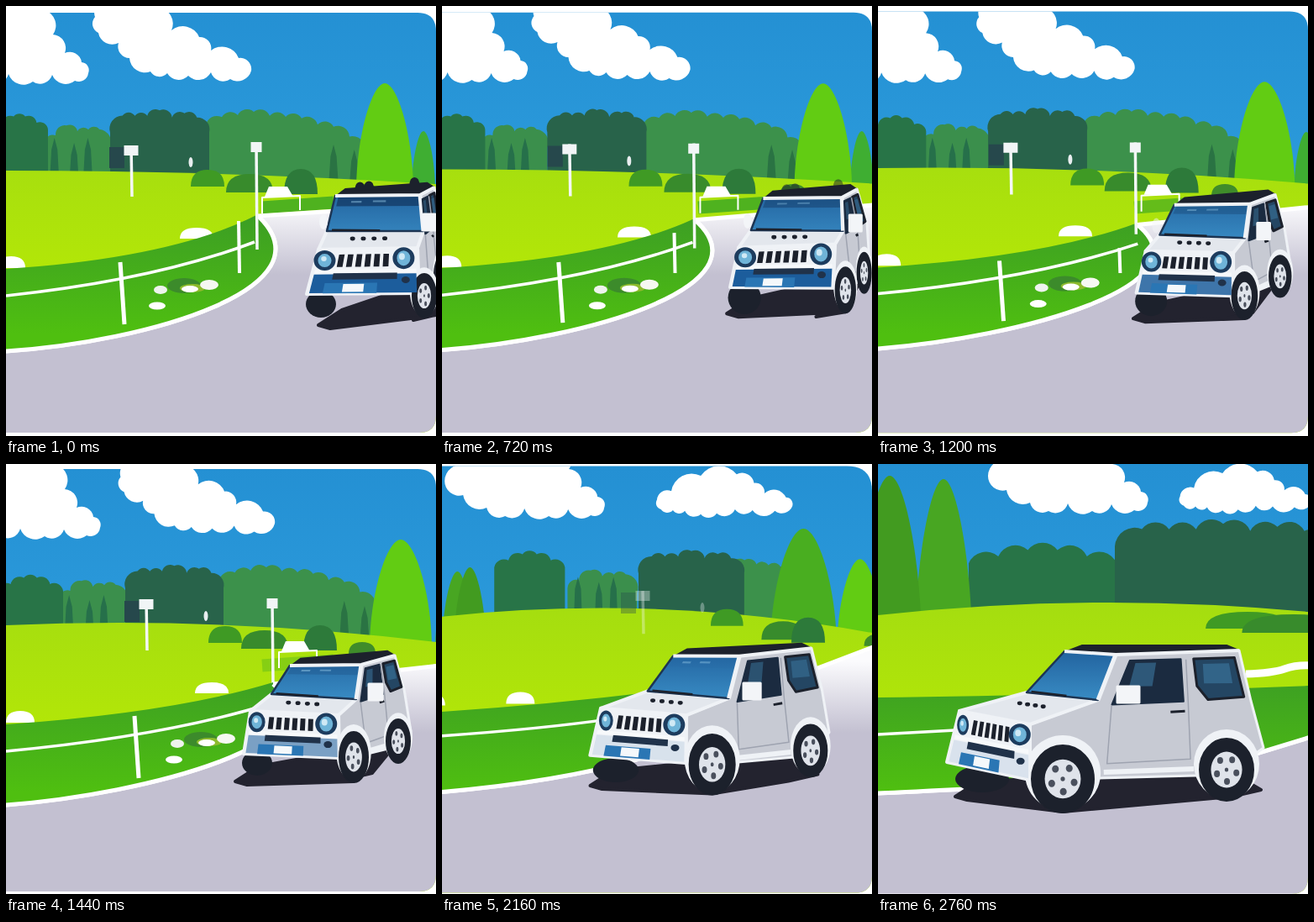
An HTML page for the animation above (2.88 s loop, 512x512 px).

```html
<!DOCTYPE html>
<html lang="en">
<head>
<meta charset="utf-8">
<title>Country road drive</title>
<style>
  html, body { margin: 0; width: 100%; height: 100%; overflow: hidden; background: #fff; }
  svg { display: block; width: 100vw; height: 100vh; }
</style>
</head>
<body>
<svg id="stage" viewBox="0 0 512 512">
  <defs>
    <clipPath id="card"><path id="cardPath"/></clipPath>
    <linearGradient id="sky" x1="0" y1="0" x2="0" y2="200" gradientUnits="userSpaceOnUse">
      <stop offset="0" stop-color="#2490d3"/><stop offset="1" stop-color="#2b9adb"/>
    </linearGradient>
    <linearGradient id="field" x1="0" y1="160" x2="0" y2="310" gradientUnits="userSpaceOnUse">
      <stop offset="0" stop-color="#a4dd10"/><stop offset="1" stop-color="#b2e608"/>
    </linearGradient>
    <linearGradient id="verge" x1="0" y1="250" x2="0" y2="390" gradientUnits="userSpaceOnUse">
      <stop offset="0" stop-color="#3c9e24"/><stop offset="1" stop-color="#4fbf10"/>
    </linearGradient>
    <linearGradient id="road" x1="0" y1="235" x2="0" y2="320" gradientUnits="userSpaceOnUse">
      <stop offset="0" stop-color="#fbfbfd"/><stop offset="1" stop-color="#c3c0d1"/>
    </linearGradient>
    <linearGradient id="glass" x1="0" y1="222" x2="0" y2="285" gradientUnits="userSpaceOnUse">
      <stop offset="0" stop-color="#22639f"/><stop offset="1" stop-color="#3a8ec6"/>
    </linearGradient>
  </defs>
  <g id="scene" clip-path="url(#card)"></g>
</svg>
<script>
const STEP = 120, LOOP = 2880;
const KEYS = [0, 480, 960, 1440, 1800, 2400, 2760];
const scene = document.getElementById('scene');
const cardPath = document.getElementById('cardPath');
const parts = [];
let now = 0;

// Monotone cubic curve through one value per key time.
function track(...v) {
  const s = v.slice(1).map((y, i) => (y - v[i]) / (KEYS[i + 1] - KEYS[i]));
  const m = v.map((_, i) => {
    const a = s[i - 1] ?? s[i], b = s[i] ?? s[i - 1];
    return a * b > 0 ? 2 * a * b / (a + b) : 0;
  });
  return () => {
    let i = KEYS.findIndex(k => k > now) - 1;
    if (i < 0) return v[v.length - 1];
    const h = KEYS[i + 1] - KEYS[i], u = (now - KEYS[i]) / h, w = 1 - u;
    return v[i] * w * w * (1 + 2 * u) + v[i + 1] * u * u * (3 - 2 * u)
      + h * u * w * (m[i] * w - m[i + 1] * u);
  };
}
function point(xs, ys) {
  const x = track(...xs), y = track(...ys);
  return () => [x(), y()];
}
const mix = (p, q, u) => [p[0] + (q[0] - p[0]) * u, p[1] + (q[1] - p[1]) * u];
const move = (p, dx, dy) => [p[0] + dx, p[1] + dy];
const pos = p => p[0].toFixed(2) + ' ' + p[1].toFixed(2);
const poly = (...ps) => 'M' + ps.map(pos).join('L') + 'Z';
const line = (...ps) => 'M' + ps.map(pos).join('L');
const box = (x, y, w, h) => `M${x} ${y}h${w}v${h}h${-w}z`;
const oval = (c, rx, ry) => `M${c[0] - rx} ${c[1]}a${rx} ${ry} 0 1 1 ${2 * rx} 0a${rx} ${ry} 0 1 1 ${-2 * rx} 0z`;
const dome = (x, y, w, h) => `M${x - w} ${y}Q${x - w} ${y - h} ${x} ${y - h}T${x + w} ${y}z`;
// Position inside a four-cornered panel: top left, top right, bottom right, bottom left.
const inside = (q, u, v) => mix(mix(q[0], q[1], u), mix(q[3], q[2], u), v);
const patch = (q, u0, v0, u1, v1) =>
  poly(inside(q, u0, v0), inside(q, u1, v0), inside(q, u1, v1), inside(q, u0, v1));

function part(fill, draw, { alpha, stroke, width = 2 } = {}) {
  const node = document.createElementNS('http://www.w3.org/2000/svg', 'path');
  node.setAttribute('fill', fill);
  if (stroke) {
    node.setAttribute('stroke', stroke);
    node.setAttribute('stroke-width', width);
    node.setAttribute('stroke-linejoin', 'round');
  }
  scene.append(node);
  parts.push({ node, draw, alpha });
}
const ink = (color, width, draw, alpha) => part('none', draw, { stroke: color, width, alpha });

// Outline whose edges bulge outwards.
function puff(ps) {
  return 'M' + pos(ps[0]) + ps.map((p, i) => {
    const q = ps[(i + 1) % ps.length];
    const r = Math.hypot(q[0] - p[0], q[1] - p[1]) * .62;
    return `A${r} ${r} 0 0 1 ${pos(q)}`;
  }).join('') + 'Z';
}
const pairs = list => list.split(' ').map(p => p.split(',').map(Number));

/* ---------- sky and clouds ---------- */
const cardTop = track(8, 8, 7, 6, 5, 1, 0);
const cardEnd = track(508, 508, 508, 509, 510, 511, 512);
const cardRound = track(22, 22, 22, 22, 22, 34, 0);

part('url(#sky)', () => box(0, 0, 512, 260));

const cloudA = pairs('0,0 -16,9 -43,2 -66,10 -95,1 -118,10 -140,0 -168,-15 -190,-32 -165,-50 -130,-75 -52,-75 -42,-46 -28,-24 -8,-13');
const tipA = point([98, 110, 93, 112, 147, 232, 321], [80, 77, 79, 76, 62, 48, 46]);
part('#fff', () => puff(cloudA.map(p => move(tipA(), ...p))));

const cloudB1 = pairs('0,0 -25,10 -48,2 -75,6 -100,3 -120,1 -145,-15 -158,-33 -182,-45 -186,-64 -172,-85 -110,-75 -95,-48 -62,-40 -48,-24 -15,-15');
const cloudB2 = pairs('0,0 -22,6 -50,5 -72,4 -95,9 -115,10 -135,6 -150,5 -165,4 -170,-8 -152,-19 -115,-38 -70,-40 -48,-29 -35,-16 -8,-11');
const tipB = point([292, 294, 298, 320, 379, 445, 516], [77, 75, 77, 71, 62, 46, 46]);
const shapeB = track(0, 0, 0, .15, 1, 1, 1);
const sizeB = track(1, 1, 1, 1, 1, .92, .92);
part('#fff', () => puff(cloudB1.map((p, i) => {
  const [x, y] = mix(p, cloudB2[i], shapeB()), k = sizeB();
  return move(tipB(), x * k, y * k);
})));

/* ---------- woods ---------- */
function woods(color, xs0, xs1, tops, n, rough, slope = 0) {
  const a = track(...xs0), b = track(...xs1), top = track(...tops);
  part(color, () => {
    const ps = [[a(), 220]];
    for (let i = 0; i <= n; i++) {
      const u = i / n, edge = Math.abs(2 * u - 1) ** 4 * 18;
      const bump = rough * (.5 + .5 * Math.sin(i * 2.4 + n));
      ps.push([a() + (b() - a()) * u, top() + 5 + edge + bump + slope * u * u]);
    }
    ps.push([b(), 220]);
    return puff(ps.slice(1, -1)).replace(/A[^A]*Z$/, '') + `L${pos(ps[n + 2])}L${pos(ps[0])}Z`;
  });
  return u => a() + (b() - a()) * u;
}
function pines(color, at, us, top, half) {
  part(color, () => us.map((u, i) => {
    const x = at(u), y = top() + i % 2 * 6;
    return poly([x - half, 215], [x - half * .6, y + 14], [x, y], [x + half * .6, y + 14], [x + half, 215]);
  }).join(''));
}
function cone(color, xs, halves, tops) {
  const x = track(...xs), w = track(...halves), top = track(...tops);
  part(color, () => {
    const cx = x(), h = w(), y = top(), k = 220 - y;
    return `M${cx - h} 220C${cx - h} ${y + k * .5} ${cx - h * .45} ${y} ${cx} ${y}`
      + `C${cx + h * .45} ${y} ${cx + h} ${y + k * .5} ${cx + h} 220z`;
  });
}

const hillAt = woods('#3c914b', [238, 239, 240, 254, 287, 345, 450], [428, 430, 431, 440, 405, 520, 620],
  [118, 119, 119, 115, 104, 108, 88], 10, 4, 28);
pines('#2a7343', hillAt, [.8, .93], track(165, 165, 165, 163, 158, 150, 140), 6);
const midAt = woods('#3b8f4c', [46, 47, 48, 63, 95, 180, 200], [124, 125, 126, 144, 176, 268, 300],
  [137, 137, 137, 134, 131, 115, 110], 6, 9);
pines('#26704a', midAt, [.15, .45, .66], track(157, 157, 157, 156, 150, 128, 128), 6);
woods('#287447', [-18, -17, -16, -10, 18, 88, 108], [50, 51, 52, 68, 101, 186, 284],
  [124, 124, 124, 128, 118, 93, 95], 5, 8);
woods('#28634a', [124, 125, 126, 142, 184, 261, 282], [242, 243, 244, 259, 292, 420, 540],
  [119, 119, 118, 116, 107, 91, 66], 8, 9);

cone('#48a622', [-60, -60, -60, -45, -8, 37, 78], [30, 30, 30, 30, 30, 12, 34], [135, 135, 135, 133, 130, 126, 18]);
cone('#429b20', [-90, -90, -90, -80, -60, 76, 14], [25, 25, 25, 25, 25, 16, 38], [130, 130, 130, 130, 130, 112, 14]);
cone('#3fae32', [497, 499, 501, 526, 560, 565, 590], [14, 14, 14, 15, 20, 20, 20], [149, 148, 150, 150, 140, 120, 120]);
cone('#49ae20', [400, 400, 400, 402, 416, 446, 570], [30, 30, 30, 30, 46, 36, 40], [210, 210, 210, 205, 121, 65, 65]);
cone('#62cc13', [451, 453, 455, 470, 501, 496, 575], [34, 34, 35, 37, 27, 28, 30], [92, 93, 91, 90, 123, 108, 108]);

/* ---------- field ---------- */
const fieldL = track(196, 195, 194, 192, 190, 178, 180);
const fieldC = track(196, 195, 194, 181, 158, 153, 152);
const fieldR = track(212, 212, 211, 212, 212, 190, 176);
part('url(#field)', () => `M0 ${fieldL()}Q256 ${fieldC()} 512 ${fieldR()}V512H0z`);

function bush(color, xs, ys, w, h, grow = track(1, 1, 1, 1, 1, 1, 1)) {
  const at = point(xs, ys);
  part(color, () => dome(at()[0], at()[1] + 6, w * grow(), h));
}
bush('#3f9a24', [240, 242, 243, 261, 290, 378, 440], [209, 209, 208, 207, 196, 184, 190], 20, 20, track(1, 1, 1, 1, .95, 1, 2.5));
bush('#388b2c', [290, 292, 293, 308, 357, 440, 495], [216, 216, 215, 214, 200, 205, 195], 28, 22, track(1, 1, 1, 1, .8, 1.1, 2.2));
bush('#2d7a3a', [351, 353, 354, 374, 389, 484, 600], [218, 218, 217, 216, 211, 204, 200], 20, 30);
bush('#3f8c2a', [428, 428, 408, 424, 456, 560, 600], [220, 220, 220, 220, 214, 210, 210], 16, 14);

const early = track(1, 1, 1, 1, 0, 0, 0);
ink('#4fb21f', 15, () => line([305, 240], [390, 234]), track(1, 1, 1, .4, 0, 0, 0));
ink('#fff', 9, () => 'M438 250Q470 249 484 244T516 240', track(0, 0, 0, 0, 0, 0, 1));

const sign = point([325, 327, 328, 345, 380, 400, 420], [221, 221, 220, 217, 212, 210, 210]);
part('#fff', () => {
  const [x, y] = sign();
  return poly([x - 12, y - 6], [x + 10, y - 6], [x + 17, y + 6], [x - 17, y + 6]);
}, { alpha: early });
ink('#fff', 2, () => {
  const [x, y] = sign();
  return line([x - 20, y + 26], [x - 20, y + 7], [x + 25, y + 5], [x + 25, y + 22]);
}, early);

const rock = point([227, 229, 229, 245, 257, 290, 300], [277, 276, 275, 273, 266, 280, 280]);
part('#fff', () => dome(...rock(), 20, 13));
const moundA = point([6, 6, 7, 17, 47, 132, 210], [312, 312, 310, 308, 297, 281, 280]);
part('#fff', () => dome(...moundA(), 17, 14));
const moundB = point([-50, -50, -50, -45, -30, 6, 60], [300, 300, 300, 300, 292, 285, 282]);
part('#fff', () => dome(...moundB(), 15, 14), { alpha: track(1, 1, 1, 1, 1, 1, 0) });

/* ---------- road and verge ---------- */
const bend = point([300, 300, 304, 318, 380, 452, 450], [250, 252, 258, 262, 262, 240, 345]);
const roadR = track(236, 236, 238, 240, 215, 220, 325);
const edgeL = track(411, 410, 409, 406, 396, 389, 392);
const edge1 = point([170, 170, 170, 170, 150, 150, 150], [400, 398, 396, 393, 385, 375, 385]);
const edge2 = point([390, 390, 392, 400, 380, 300, 300], [335, 334, 334, 330, 335, 360, 380]);
const curb = () => `M0 ${edgeL()}C${pos(edge1())} ${pos(edge2())} ${pos(bend())}`;
part('url(#road)', () => curb() + `L516 ${roadR()}V514H-4V${edgeL()}z`, { stroke: '#fff', width: 5 });

const vergeL = track(313, 312, 312, 310, 300, 291, 278);
const vergeC = track(300, 300, 300, 296, 285, 280, 276);
const vergeEnd = point([300, 300, 304, 318, 380, 452, 515], [248, 250, 256, 260, 262, 240, 264]);
const vergeLow = point([300, 300, 304, 318, 380, 452, 515], [250, 252, 258, 262, 262, 240, 325]);
part('url(#verge)', () => curb() + `L${pos(vergeLow())}L${pos(vergeEnd())}Q200 ${vergeC()} 0 ${vergeL()}z`);
ink('#fff', 5, () => curb() + `L${pos(vergeLow())}`);

const stones = point([0, 4, 6, 20, 55, 90, 120], [0, 0, -1, -5, -15, -20, -20]);
const stone = (color, x, y, rx, ry) => part(color, () => oval(move(stones(), x, y), rx, ry), { alpha: early });
stone('#3c8b2b', 212, 333, 20, 9);
stone('#8dbb2c', 222, 336, 15, 5);
stone('#fff', 180, 357, 10, 4.5);
stone('#eef3ee', 184, 338, 8, 5);
stone('#f6f8f2', 242, 332, 11, 6);
stone('#fff', 219, 337, 10, 4);

const railL = track(345, 345, 343, 342, 330, 322, 322);
const railC = track(326, 326, 325, 324, 316, 315, 319);
const railEnd = point([296, 297, 301, 316, 262, 160, 92], [281, 281, 282, 285, 298, 307, 317]);
ink('#fff', 3.5, () => `M0 ${railL()}Q${railEnd()[0] * .6} ${railC()} ${pos(railEnd())}`);
const postTop = point([136, 138, 140, 153, 182, 243, 320], [305, 305, 305, 300, 290, 285, 285]);
const postLow = track(379, 378, 376, 374, 361, 360, 360);
ink('#fff', 5, () => line(postTop(), [postTop()[0] + 5, postLow()]));
const farPost = point([277, 275, 280, 300, 340, 340, 340], [256, 256, 286, 290, 300, 320, 320]);
ink('#fff', 4, () => line(farPost(), move(farPost(), 1, 62 - (farPost()[1] - 256))), early);

function lamp(xs, ys, length, w, alpha) {
  const at = point(xs, ys), len = track(...length);
  ink('#f4f7f8', 3.5, () => line(at(), move(at(), 1, len())), alpha);
  part('#f1f5f6', () => box(at()[0] - w, at()[1], 2 * w, 12), { alpha });
  return at;
}
const lampAt = point([149, 151, 153, 167, 196, 275, 350], [166, 165, 164, 161, 155, 150, 150]);
const lampOn = track(1, 1, 1, 1, 1, 0, 0);
part('#26484c', () => box(lampAt()[0] - 26, lampAt()[1] + 2, 18, 25), { alpha: lampOn });
part('#e9eef0', () => oval(move(lampAt(), 71, 20), 2.5, 6), { alpha: lampOn });
lamp([149, 151, 153, 167, 196, 275, 350], [166, 165, 164, 161, 155, 150, 150], [61, 62, 62, 61, 55, 50, 50], 8.5, lampOn);
lamp([298, 299, 301, 317, 360, 400, 420], [162, 163, 164, 160, 158, 150, 150], [128, 127, 121, 100, 100, 100, 100], 6.5, early);

/* ---------- car ---------- */
const joints = {
  noseL: point([372, 362, 340, 291, 243, 152, 97], [290, 287, 289, 294, 294, 289, 294]),
  noseR: point([490, 482, 447, 396, 352, 247, 181], [288, 282, 287, 299, 297, 302, 310]),
  cowlL: point([382, 378, 352, 316, 280, 220, 177], [268, 265, 270, 274, 272, 270, 272]),
  cowlR: point([497, 492, 456, 417, 382, 312, 262], [268, 266, 271, 280, 279, 279, 281]),
  topL: point([392, 392, 366, 338, 307, 254, 222], [226, 227, 232, 240, 233, 226, 223]),
  topR: point([493, 487, 460, 423, 389, 329, 283], [225, 226, 231, 239, 234, 227, 227]),
  roof: point([510, 503, 483, 463, 447, 436, 430], [216, 217, 220, 228, 223, 218, 222]),
  belt: point([516, 514, 494, 474, 457, 450, 444], [260, 258, 262, 268, 268, 272, 282]),
  tail: point([520, 516, 500, 482, 461, 461, 459], [330, 318, 305, 318, 315, 325, 338]),
  chinL: point([358, 353, 327, 283, 231, 139, 82], [343, 334, 337, 345, 344, 350, 355]),
  chinR: point([492, 480, 446, 397, 354, 245, 181], [342, 334, 339, 350, 350, 363, 376]),
  wheelL: point([375, 369, 346, 299, 255, 174, 124], [355, 347, 348, 356, 360, 368, 375]),
  wheelF: point([498, 495, 457, 414, 374, 283, 220], [345, 337, 341, 349, 352, 363, 375]),
  wheelR: point([518, 512, 490, 467, 447, 433, 415], [322, 320, 316, 330, 335, 347, 364]),
  sizeL: point([18, 19, 20, 18, 22, 30, 32], [16, 19, 20, 15, 14, 15, 16]),
  sizeF: point([14, 11, 13, 17, 20, 32, 37], [26, 27, 27, 30, 34, 37, 40]),
  sizeR: point([8, 6, 11, 14, 15, 24, 32], [24, 24, 24, 26, 28, 33, 37]),
  mirror: point([504, 502, 476, 440, 407, 342, 298], [257, 256, 262, 271, 270, 270, 274]),
  shadeL: point([372, 349, 327, 273, 218, 148, 92], [380, 366, 367, 378, 380, 386, 396]),
  shadeR: point([520, 500, 460, 436, 428, 458, 456], [366, 362, 362, 368, 366, 374, 388]),
};
let J = {};
const nose = () => [J.noseL, J.noseR, J.chinR, J.chinL];
const hood = () => [J.cowlL, J.cowlR, J.noseR, J.noseL];
const cabin = () => [J.topR, J.roof, J.belt, J.cowlR];
const screen = () => [J.topL, J.topR, J.cowlR, J.cowlL];
const DARK = '#1c212c', WHITE = '#eff2f6', GREY = '#c7cad3';

part('#23232f', () => {
  const a = J.shadeL, b = J.shadeR, f = J.wheelF;
  return poly(a, move(a, 28, -18), J.wheelR, b, move(b, -35, 8), [f[0], f[1] + J.sizeF[1] - 1], move(a, 14, 4));
}, { stroke: '#23232f', width: 4 });
part(DARK, () => oval(J.wheelL, ...J.sizeL));
part(GREY, () => poly(J.noseR, J.cowlR, J.topR, J.roof, J.belt, J.tail, move(J.wheelR, 0, 6), J.wheelF, J.chinR),
  { stroke: WHITE, width: 3 });
part(WHITE, () => poly(...nose()), { stroke: WHITE, width: 4 });
part('#e3e7ed', () => poly(...hood()), { stroke: WHITE, width: 4 });

// glass and roof
part('url(#glass)', () => poly(...screen()), { stroke: '#1d3553', width: 2.5 });
part('#12355f', () => patch(screen(), .04, .02, .98, .3), { alpha: track(.7, .5, .4, .2, .1, 0, 0) });
part('#8fc3e4', () => patch(screen(), .2, .15, .32, .2) + patch(screen(), .45, .14, .6, .19), { alpha: track(.5, .4, .4, .5, .7, .2, 0) });
ink(DARK, 2.5, () => line(inside(screen(), .05, .97), inside(screen(), .55, .98)));
ink(WHITE, 5, () => line(J.topR, J.cowlR));
part(DARK, () => poly(J.topL, move(mix(J.topL, J.roof, .1), 0, -8), move(mix(J.topL, J.roof, .93), 0, -7),
  move(J.roof, 0, -1), J.topR));
part(DARK, () => [.25, .34, .8].map(u => dome(...move(mix(J.topL, J.roof, u), 0, -4), 6, 10)).join(''),
  { alpha: track(1, 1, 0, 0, 0, 0, 0) });
ink(WHITE, 4, () => line(J.topL, J.topR, J.roof));
part('#1b2b40', () => poly(inside(cabin(), .13, .14), inside(cabin(), .53, .14), inside(cabin(), .56, 1.02), inside(cabin(), .1, 1.1)),
  { stroke: '#1b2b40', width: 2 });
part('#244663', () => poly(inside(cabin(), .63, .14), inside(cabin(), .95, .14), inside(cabin(), .96, .92), inside(cabin(), .72, .98), inside(cabin(), .65, .7)),
  { stroke: DARK, width: 3 });
part('#3f7ea8', () => patch(cabin(), .18, .2, .34, .7) + patch(cabin(), .7, .25, .9, .65), { alpha: track(.4, .4, .4, .5, .5, .45, .55) });

// door
const sill = u => move(mix(J.wheelF, J.wheelR, u), 0, -J.sizeF[1] * .38);
ink('#9ea3b0', 1.5, () => line(inside(cabin(), .1, 1.12), sill(.27), sill(.78), inside(cabin(), .59, 1.05), inside(cabin(), .57, .15)));
ink(WHITE, 6, () => line(move(sill(.25), 0, 10), move(sill(.8), 0, 12)));
ink(DARK, 3, () => line(inside(cabin(), .48, 1.24), inside(cabin(), .57, 1.22)));

// wheels
function wheel(hub, size) {
  part(WHITE, () => oval(move(J[hub], 0, -J[size][1] * .18), J[size][0] * 1.22, J[size][1] * 1.12));
  part(DARK, () => oval(J[hub], ...J[size]), { stroke: DARK, width: 2 });
  part('#dfe3ea', () => oval(J[hub], J[size][0] * .58, J[size][1] * .58));
  part('#4a505d', () => {
    const [rx, ry] = J[size];
    return [0, 1, 2, 3, 4].map(i => {
      const a = i * Math.PI * .4 - now * .004;
      return oval(move(J[hub], Math.cos(a) * rx * .38, Math.sin(a) * ry * .38), rx * .11, ry * .11);
    }).join('') + oval(J[hub], rx * .07, ry * .07);
  });
}
wheel('wheelR', 'sizeR');
wheel('wheelF', 'sizeF');

// front
const blue = track(1, 1, 1, .55, .15, .1, .1);
part('#1c5d9c', () => patch(nose(), .02, .56, .98, .98), { alpha: blue });
part('#20324a', () => patch(nose(), .2, .52, .8, .68));
part('#2a76b4', () => patch(nose(), .14, .76, .62, .99));
part('#f4f8fb', () => patch(nose(), .31, .78, .5, .96));
part('#f7f9fb', () => patch(nose(), .02, .46, .98, .54));
part(DARK, () => {
  let d = '';
  for (let i = 0; i < 6; i++) d += patch(nose(), .22 + i * .088, .12, .275 + i * .088, .4);
  return d;
});
const lightW = track(13, 13, 13, 10, 9, 8, 7);
part('#1d3c5e', () => oval(inside(nose(), .09, .25), lightW(), 12) + oval(inside(nose(), .86, .22), 13, 13));
part('#6fb4d8', () => oval(inside(nose(), .09, .25), lightW() * .62, 8) + oval(inside(nose(), .86, .22), 8, 9));
part('#cfe9f5', () => oval(move(inside(nose(), .09, .25), -1, -2), lightW() * .25, 3) + oval(move(inside(nose(), .86, .22), -2, -2), 3.5, 4));
part('#20324a', () => oval(inside(nose(), .88, .7), 5, 4));
part(DARK, () => [.3, .41, .52, .63].map(u => oval(inside(hood(), u, .42), 3, 2.4)).join(''));

// mirrors
const mirrorW = track(7, 7, 7, 8, 9, 11, 13);
part('#f3f5f8', () => {
  const w = mirrorW();
  return box(J.mirror[0] - w, J.mirror[1] - 9, 2 * w, 19);
}, { stroke: '#f3f5f8', width: 3 });
part('#f3f5f8', () => oval(move(J.cowlL, -4, -11), 5, 9), { alpha: track(1, 1, 1, 0, 0, 0, 0) });

/* ---------- clock ---------- */
function render(time) {
  now = time;
  for (const k in joints) J[k] = joints[k]();
  const top = cardTop(), end = cardEnd(), r = cardRound();
  cardPath.setAttribute('d', `M0 ${top}H${512 - r}Q512 ${top} 512 ${top + r}V${end - 20}Q512 ${end} 492 ${end}H0z`);
  for (const { node, draw, alpha } of parts) {
    node.setAttribute('d', draw());
    if (alpha) node.setAttribute('opacity', alpha().toFixed(3));
  }
}
let shown = -1, start = performance.now();
function tick() {
  const time = Math.floor(((performance.now() - start) % LOOP) / STEP) * STEP;
  if (time !== shown) render(shown = time);
  requestAnimationFrame(tick);
}
tick();
</script>
</body>
</html>
```
